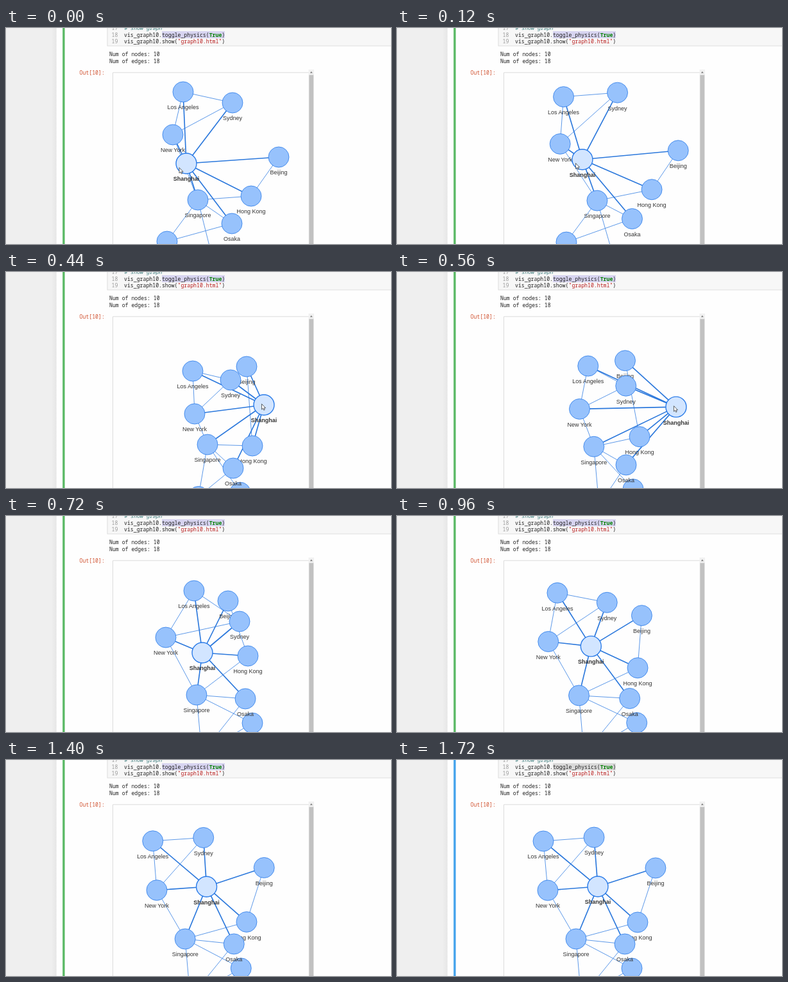
Animation, 600 px wide and 338 px high, one loop 1760 ms. Source, as an HTML page:

```html
<!DOCTYPE html>
<html lang="en">
<head>
<meta charset="utf-8">
<title>Notebook graph</title>
<style>
  html, body { margin: 0; width: 100%; height: 100%; overflow: hidden; background: #fff; }
  svg { display: block; width: 100vw; height: 100vh; }
  .code { font: 8.2px "Noto Sans Mono", "DejaVu Sans Mono", monospace; fill: #222; white-space: pre; }
  .gutter { fill: #999; }
  .comment { fill: #408080; font-style: italic; }
  .keyword { fill: #008000; font-weight: bold; }
  .string { fill: #ba2121; }
  .prompt { fill: #d0512f; }
  .edge { stroke: #3f86e4; stroke-width: .85; }
  .edge.strong { stroke: #2b78dc; stroke-width: 1.65; }
  .node circle { fill: #97c2fc; stroke: #2b7ce9; stroke-width: .8; }
  .node text { font: 9px "Liberation Sans", Arial, sans-serif; fill: #343434; text-anchor: middle; }
  .node.selected circle { fill: #d2e5ff; stroke-width: 1.4; }
  .node.selected text { font-weight: bold; }
  #bar { fill: #5bb966; animation: bar 1760ms step-end infinite; }
  #selection { fill: #d7d4f0; animation: selection 1760ms step-end infinite; }
  @keyframes bar { 97.7% { fill: #45a3ec; } }
  @keyframes selection { 97.7% { fill: #d9d9d9; } }
</style>
</head>
<body>
<svg viewBox="0 0 600 338" preserveAspectRatio="none">
  <defs>
    <linearGradient id="shade">
      <stop offset="0" stop-color="#efefef"/>
      <stop offset="1" stop-color="#e6e6e6"/>
    </linearGradient>
  </defs>
  <rect width="600" height="338" fill="#fefefe"/>
  <rect width="78.5" height="338" fill="#efefef"/>
  <rect x="71" width="7.5" height="338" fill="url(#shade)"/>
  <rect id="bar" x="88.2" width="3.4" height="338"/>

  <rect x="158" y="-5" width="450" height="33" fill="#f7f7f7" stroke="#d6d6d6" stroke-width=".8"/>
  <rect id="selection" x="243" y="5" width="98" height="11"/>
  <g class="code">
    <text class="gutter" x="164.5" y="2.7">17</text>
    <text class="gutter" x="164.5" y="13.5">18</text>
    <text class="gutter" x="164.5" y="24.3">19</text>
    <text class="comment" x="184" y="2.7"># show graph</text>
    <text x="184" y="13.5">vis_graph10.toggle_physics(<tspan class="keyword">True</tspan>)</text>
    <text x="184" y="24.3">vis_graph10.show(<tspan class="string">"graph10.html"</tspan>)</text>
    <text x="161" y="44">Num of nodes: 10</text>
    <text x="161" y="54.6">Num of edges: 18</text>
    <text class="prompt" x="114.5" y="73">Out[10]:</text>
  </g>

  <path d="M166.5 338V69.8H472" fill="none" stroke="#d9d9d9" stroke-width=".9"/>
  <rect x="471.5" y="65" width="8.5" height="273" fill="#f1f1f1"/>
  <rect x="472.3" y="73.5" width="6.9" height="265" fill="#c1c1c1"/>
  <path d="M473.8 70.4l2-2.4 2 2.4z" fill="#777"/>

  <g id="edges"></g>
  <g id="nodes"></g>
  <path id="cursor" d="M0 0V8.6L2 6.8 3.3 9.7 4.7 9.1 3.5 6.3H6.1Z" fill="#fff" stroke="#222" stroke-width=".7"/>
</svg>
<script>
const LOOP = 1760, STEP = 40;
const RELEASE = 560;
const SETTLE = 105;
const hub = 'Shanghai';

// Each node passes four poses while the hub is dragged, then springs to its resting place.
const poseTimes = [0, 280, 440, 720];
const freeFrom = poseTimes[3];
const poses = {
  'Beijing':     [[425, 202], [437, 175], [375, 148], [346, 133], [403, 169]],
  'Hong Kong':   [[382, 263], [407, 248], [384, 272], [377, 219], [375, 254]],
  'Sydney':      [[353, 117], [337, 101], [350, 169], [364, 165], [307, 121]],
  'Osaka':       [[352, 306], [376, 294], [354, 307], [373, 286], [355, 288]],
  'Singapore':   [[299, 269], [323, 271], [314, 270], [297, 280], [279, 280]],
  'Los Angeles': [[276, 100], [252, 123], [291, 155], [293, 117], [228, 127]],
  'New York':    [[260, 167], [257, 201], [294, 222], [249, 190], [235, 204]],
  [hub]:         [[281, 212], [317, 201], [402, 208], [306, 214], [313, 198]]
};
const backToFront = ['Beijing', 'Hong Kong', 'Tokyo', 'Sydney', 'Osaka',
  'Singapore', 'Los Angeles', 'New York', 'London', hub];

const neighbours = {
  [hub]: ['Los Angeles', 'Sydney', 'New York', 'Beijing', 'Hong Kong', 'Singapore', 'Osaka'],
  'New York': ['Los Angeles', 'Sydney', 'Singapore'],
  'Los Angeles': ['Sydney'],
  'Hong Kong': ['Beijing', 'Singapore'],
  'Singapore': ['Osaka', 'London', 'Tokyo'],
  'London': ['Osaka', 'Tokyo']
};

const byId = id => document.getElementById(id);
const mix = (a, b, u) => a.map((v, i) => v + (b[i] - v) * u);
const sum = (a, b) => a.map((v, i) => v + b[i]);
const progress = (t, from, to) => Math.min(1, Math.max(0, (t - from) / (to - from)));
const smooth = u => u * u * (3 - 2 * u);

function add(parent, tag, attrs = {}) {
  const el = document.createElementNS('http://www.w3.org/2000/svg', tag);
  for (const key in attrs) el.setAttribute(key, attrs[key]);
  return parent.appendChild(el);
}

// Critically damped return from an offset and a velocity.
function spring(offset, velocity, elapsed) {
  return (offset + (velocity + offset / SETTLE) * elapsed) * Math.exp(-elapsed / SETTLE);
}

// One coordinate: a Hermite curve through the poses, then the spring.
function coordinate(p, t) {
  const k = poseTimes;
  const slope = i => (p[i + 1] - p[i]) / (k[i + 1] - k[i]);
  const tangent = i => {
    if (i === 0) return slope(0);
    if (i === 3) return slope(2);
    return mix([slope(i - 1)], [slope(i)], (k[i] - k[i - 1]) / (k[i + 1] - k[i - 1]))[0];
  };
  if (t >= freeFrom) return p[4] + spring(p[3] - p[4], tangent(3), t - freeFrom);
  let i = 0;
  while (t >= k[i + 1]) i++;
  const h = k[i + 1] - k[i], u = (t - k[i]) / h;
  return p[i] + (p[i + 1] - p[i]) * smooth(u)
    + h * u * (1 - u) * (tangent(i) * (1 - u) - tangent(i + 1) * u);
}

function layout(t) {
  const at = {};
  for (const name in poses) {
    at[name] = [0, 1].map(axis => coordinate(poses[name].map(p => p[axis]), t));
  }
  // The pointer pulls the hub further right before letting go.
  at[hub][0] += 55 * Math.sin(Math.PI * progress(t, 440, freeFrom)) ** 2;
  // The lowest nodes hang from their neighbours and swing across.
  at.Tokyo = sum(at.Osaka, mix([-27, 67], [11, 38], smooth(progress(t, 280, 440))));
  at.London = sum(at.Singapore, mix([-48, 65], [8, 92], smooth(progress(t, 280, RELEASE))));
  return at;
}

const edges = Object.entries(neighbours).flatMap(([from, list]) => list.map(to => ({
  from, to, el: add(byId('edges'), 'line', { class: from === hub ? 'edge strong' : 'edge' })
}))).reverse();
edges.forEach(edge => byId('edges').append(edge.el));

const nodes = backToFront.map(name => {
  const el = add(byId('nodes'), 'g', { class: name === hub ? 'node selected' : 'node' });
  add(el, 'circle', { r: 16 });
  add(el, 'text', { y: 27.4 }).textContent = name;
  return { name, el };
});

const place = (el, [x, y]) => el.setAttribute('transform', `translate(${x} ${y})`);

function draw(t) {
  const at = layout(t);
  for (const { name, el } of nodes) place(el, at[name]);
  for (const { from, to, el } of edges) {
    const [x1, y1] = at[from], [x2, y2] = at[to];
    for (const [key, value] of Object.entries({ x1, y1, x2, y2 })) el.setAttribute(key, value);
  }
  const cursor = byId('cursor');
  cursor.style.display = t <= RELEASE ? '' : 'none';
  place(cursor, sum(at[hub], mix([-11, 6.5], [-3.5, -1.5], progress(t, 0, 440) ** 2)));
}

const start = performance.now();
function tick() {
  const t = (performance.now() - start) % LOOP;
  draw(Math.floor(t / STEP) * STEP);
  requestAnimationFrame(tick);
}
tick();
</script>
</body>
</html>
```
